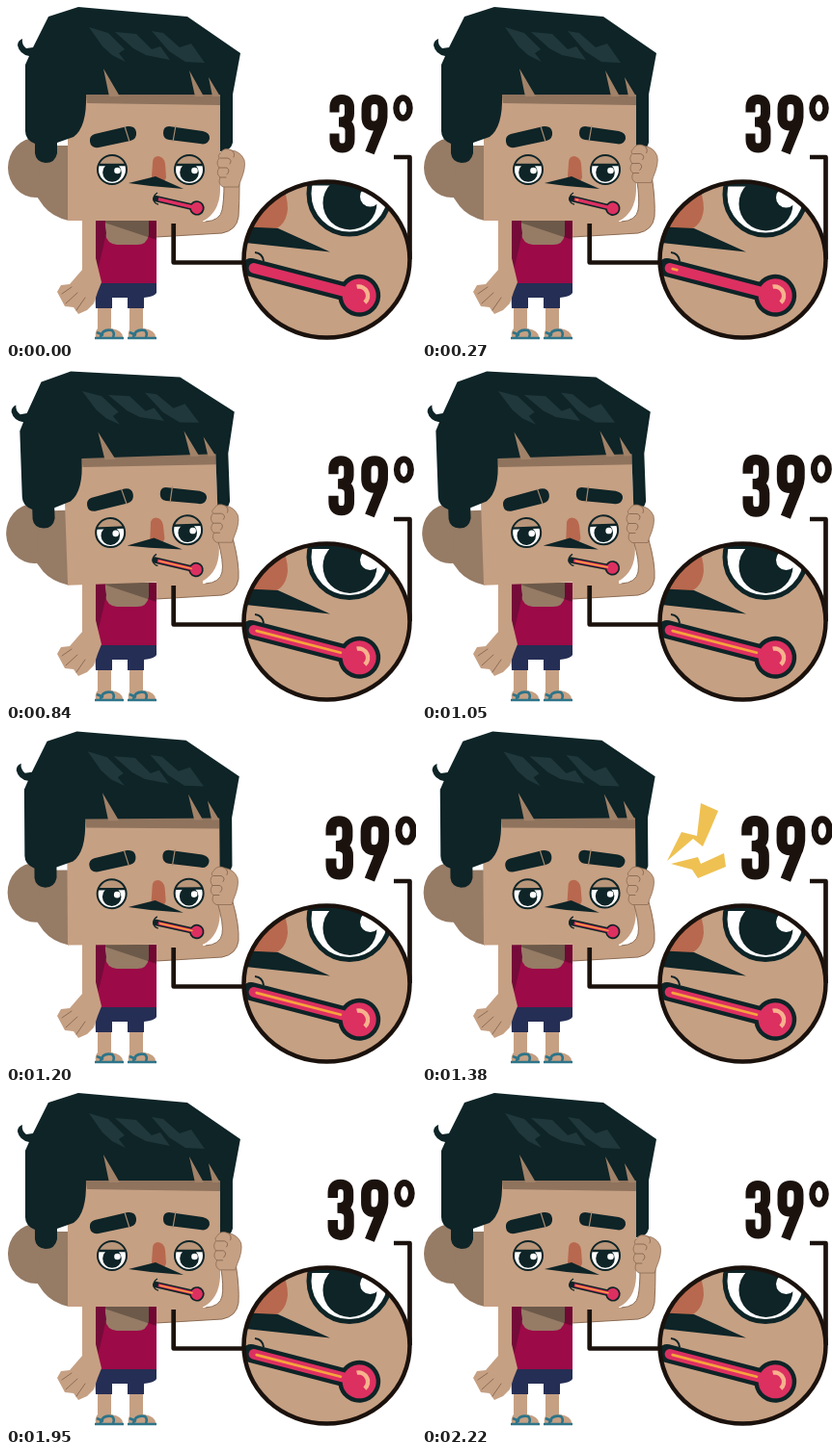
Recreate the animation shown at these times as an HTML page. Size 425 px wide and 347 px high, loop 2.25 s.

```html
<!DOCTYPE html>
<html lang="en">
<head>
<meta charset="utf-8">
<title>Fever</title>
<style>
html, body { margin: 0; width: 100%; height: 100%; overflow: hidden; background: #fff; }
svg { display: block; width: 100vw; height: 100vh; }
.skin { fill: #c6a083; }
.shade { fill: #967b65; }
.ink { fill: #0e2427; }
.red { fill: #dc3061; }
.nose { fill: #b8684e; }
.line { fill: none; stroke: #0e2427; }
.crease { fill: none; stroke: #8c6c53; stroke-width: 1; stroke-linecap: round; stroke-linejoin: round; }
.frame { fill: none; stroke: #1b120d; }
</style>
</head>
<body>
<svg viewBox="0 0 425 347" preserveAspectRatio="none">
  <defs>
    <clipPath id="lens"><ellipse cx="332.5" cy="263.5" rx="86" ry="81"/></clipPath>
    <clipPath id="socket"><circle r="14.5"/></clipPath>
    <g id="eye">
      <g clip-path="url(#socket)">
        <circle r="15" fill="#fff"/>
        <circle class="ink" cy="3" r="9.8"/>
        <circle cx="5.5" cy="1" r="3.3" fill="#fff"/>
        <path d="M-16 -17H16V-5H-16Z" fill="#b9967a"/>
        <path class="line" stroke-width="2.4" d="M-16 -5H16"/>
      </g>
      <circle class="line" r="15" stroke-width="2"/>
    </g>
  </defs>

  <g id="legs">
    <path class="skin" d="M95 308H109V340H95ZM128 308H142V340H128Z"/>
    <path fill="#252e54" d="M92 288H156V298Q154 302 143 303V314H126V303H110V314H93Z"/>
    <g id="foot">
      <path class="skin" d="M95 335H109Q121 337 121 344H93Q92 338 95 335Z"/>
      <path d="M92 345H122M98 344Q100 335 110 337Q113 340 111 344M94 339L101 342" fill="none" stroke="#2d7489" stroke-width="2.6"/>
    </g>
    <use href="#foot" x="34"/>
  </g>

  <g id="torso">
    <path fill="#9c0a47" d="M80 223H156V288H92L80 270Z"/>
    <path class="shade" d="M103 223H148V238Q146 248 136 248H115Q104 247 103 236Z"/>
    <path fill="#000" fill-opacity=".28" d="M96 223H156V243Z"/>
    <path fill="#740b39" d="M92 223H102L104 236L98 262L92 286Z"/>
    <path class="skin" d="M79 222H93V262L99 287L95 297L91 309L84 316L75 320L70 313L61 312L53 297L57 290L66 289L79 274Z"/>
    <path class="crease" d="M58 299L68 292M62 309L74 298M73 316L82 303"/>
  </g>

  <path class="skin" d="M156 218H204V236L156 240Z"/>

  <g id="head">
    <ellipse class="shade" cx="31" cy="168" rx="29" ry="31"/>
    <path class="shade" d="M37 145H65V223Q48 219 39 208L32 198Z"/>
    <path class="skin" d="M64 86H222V192Q221 214 205 223H64Z"/>
    <path fill="#8f735d" d="M82 88H222V103L84 101Z"/>
    <path class="ink" d="M44 11L75 1L188 11L243 49L235 92L235 142Q233 151 222 151V92H83Q84 126 70 136L53 142V153Q51 163 41 163Q31 162 30 153V143Q20 139 20 130V61L24 52Q14 50 12 41Q12 36 17 34Q16 40 21 44L28 43Z"/>
    <path fill="#a18268" d="M101 65L118 94H107ZM190 67L205 94H196ZM210 74L222 94H214Z"/>
    <path fill="#20383b" d="M86 22L106 28L123 45L117 49L124 58L110 51L100 42ZM113 27L135 29L151 45L160 42L170 56L145 51L132 44ZM151 26L163 28L180 43L192 39L206 59L186 58L169 47Z"/>

    <path class="ink" d="M92 133L126 125Q134 124 135 131Q136 138 129 140L96 147Q88 148 87 141Q86 135 92 133ZM169 125L204 130Q212 132 211 138Q209 145 201 143L169 139Q163 138 163 132Q163 125 169 125Z"/>
    <path d="M123 125L128 141M176 124L173 141" stroke="#a98b72" stroke-width="1.2"/>

    <use href="#eye" x="110" y="170"/>
    <use href="#eye" x="190" y="170"/>

    <path class="nose" d="M152 163Q152 156 158 156Q164 157 165 164L166 178Q164 185 157 184Q150 183 151 177Z"/>
    <path class="ink" d="M127 184L155 177L184 190L150 187Z"/>
    <path class="line" stroke-width="1.3" d="M157 194Q152 197 153 202Q155 206 158 206"/>
    <g id="stick">
      <path class="line" stroke-width="6.5" stroke-linecap="round" d="M155.5 200H194"/>
      <circle class="ink" cx="199" cy="200" r="7.7"/>
      <path stroke="#dc3061" stroke-width="3.4" d="M158 200H196"/>
      <circle class="red" cx="199" cy="200" r="6"/>
      <path id="smallHeat" stroke="#f6a33c" stroke-width="1.5" stroke-linecap="round"/>
    </g>
  </g>

  <path id="arm" class="skin"/>
  <path id="edge" class="crease"/>
  <g id="fist">
    <path class="skin" stroke="#8c6c53" stroke-width=".8" d="M222 153Q226 146 234 150Q243 151 247 160Q249 168 243 182L241 188H225Q219 185 222 178Q217 174 221 168Q217 163 221 158Q219 155 222 153Z"/>
    <path class="crease" d="M222 158H230Q235 160 232 164M221 168H229Q233 171 229 175M222 178H228M234 150Q238 153 236 157"/>
  </g>

  <path class="frame" stroke-width="4.7" stroke-linejoin="round" d="M173.700 226V266.500H250M402 157H418.500V263"/>

  <g clip-path="url(#lens)">
    <path class="skin" d="M240 175H425V347H240Z"/>
    <path class="nose" d="M240 180H283Q292 195 292 211Q290 233 267 235Q250 234 240 222Z"/>
    <path class="ink" d="M240 229L282 231L336 255.500L240 245Z"/>
    <g id="bigEye">
      <circle cx="356" cy="195" r="42" fill="#fff" stroke="#0e2427" stroke-width="5"/>
      <circle class="ink" cx="356.500" cy="204.500" r="28"/>
      <circle cx="377.500" cy="198" r="10.500" fill="#fff"/>
      <path fill="#b9967a" d="M316 150H396V184H316Z"/>
      <path class="line" stroke-width="5" d="M314 184H399"/>
    </g>
    <path class="line" stroke-width="2" d="M258 256Q266 257 267 265"/>
    <g transform="translate(253 271.300) rotate(14.600)">
      <path class="line" stroke-width="19" stroke-linecap="round" d="M1 0H108"/>
      <circle class="ink" cx="117" cy="0" r="22"/>
      <path stroke="#dc3061" stroke-width="10.500" stroke-linecap="round" d="M4 0H112"/>
      <circle class="red" cx="117" cy="0" r="17.500"/>
      <path d="M114 -9A9.500 9.500 0 0 1 123 7" fill="none" stroke="#f6b28d" stroke-width="4.500" transform="rotate(-12 117 0)"/>
      <path id="bigHeat" stroke="#f6a33c" stroke-width="2.800" stroke-linecap="round"/>
    </g>
  </g>
  <ellipse class="frame" cx="332.500" cy="263.500" rx="86" ry="81" stroke-width="4.500"/>

  <g id="bolts" fill="#efc152">
    <path d="M289 76L307 84L299 103L291 121L281 113L254 136L269 106L285 110Z"/>
    <path d="M258 139L286 132L289 139L313 128L315 142L286 154L280 145Z"/>
  </g>

  <g id="reading" class="frame" stroke-width="10" role="img" aria-label="39º">
    <path d="M340.500 111V106Q340.500 97.500 348 97.500Q356 97.500 356 106V112Q356 121 345 121Q356.500 121 356.500 130V139Q356.500 148 348.500 148Q340.500 148 340.500 139V133"/>
    <path d="M390.500 112V107Q390.500 97.500 382 97.500Q373.500 97.500 373.500 107V116Q373.500 125 381 125Q390.500 125 390.500 112Q391 120 387 128L377 153"/>
    <ellipse cx="411.500" cy="106.500" rx="7" ry="10.500" stroke-width="6.500"/>
  </g>
</svg>
<script>
const LOOP = 2250, STEP = 30;
const el = id => document.getElementById(id);
const set = (id, name, value) => el(id).setAttribute(name, value);
const clamp = x => Math.min(1, Math.max(0, x));
const within = (t, a, b) => t >= a && t < b;
const ease = (t, a, b) => {
  const x = clamp((t - a) / (b - a));
  return x * x * (3 - 2 * x);
};

function tilt(t) {
  const start = 602, period = 685;
  if (!within(t, start, start + 2 * period)) return 0;
  return -1.3 * (1 - Math.cos(2 * Math.PI * (t - start) / period));
}

function droop(t) {
  const x = (t - 600) / 400;
  return Math.abs(x) < 1 ? 6.5 * Math.cos(x * Math.PI / 2) ** 2 : 0;
}

function drawArm(t) {
  const up = ease(t, 0, 480) - ease(t, 1720, 2170);
  const slide = ease(t, 560, 1000) * up;
  const dx = -5.5 * up - 1.5 * slide, dy = -7.5 * up + slide;
  set("fist", "transform", `translate(${dx} ${dy})`);
  const wrist = 185 + dy;
  const outer = `M${242 + dx} ${wrist}Q242 203 241 219Q239 233 224 236L156 240`;
  const inner = `224H207Q222 223 224 212Q226 202 ${226 + dx} ${wrist}`;
  set("arm", "d", `${outer}V${inner.replace("H", "L").replace("207Q", "207 224Q")}Z`);
  set("edge", "d", `${outer}M207 ${inner.replace("H207", "")}`);
}

function drawHeat(t) {
  const k = clamp((t - 240) / 570);
  set("bigHeat", "d", k ? `M7 0H${7 + 90 * k}` : "");
  set("smallHeat", "d", k ? `M160 200H${160 + 34 * k}` : "");
}

function draw(t) {
  set("head", "transform", `rotate(${tilt(t)} 140 222)`);
  set("stick", "transform", `rotate(${13 + droop(t)} 155 200)`);
  drawArm(t);
  drawHeat(t);
  set("bigEye", "transform", `translate(0 ${1.5 * ease(t, 0, 450)})`);
  const grow = 1 + 0.1 * (ease(t, 600, 1300) - ease(t, 1680, 2190));
  set("reading", "transform", `translate(378 121.500) scale(${grow}) translate(-378 -122)`);
  const flash = within(t, 390, 810) || within(t, 1260, 1770);
  set("bolts", "visibility", flash ? "visible" : "hidden");
}

const begin = performance.now();
function tick(now) {
  const t = Math.max(0, now - begin) % LOOP;
  draw(Math.floor(t / STEP) * STEP);
  requestAnimationFrame(tick);
}
draw(0);
requestAnimationFrame(tick);
</script>
</body>
</html>
```
